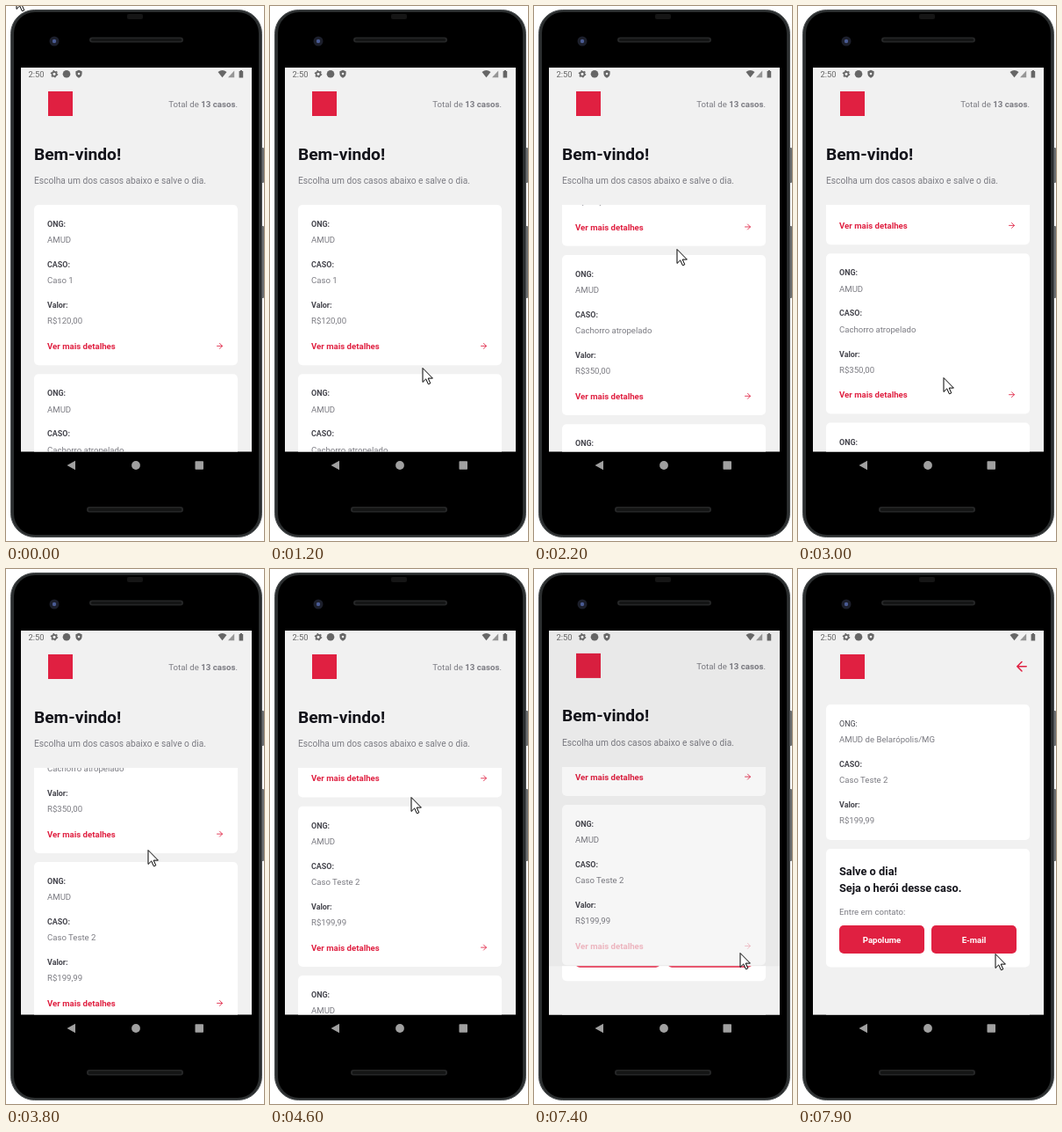
An HTML page for the animation above (8 s loop, 294 px wide and 608 px high).

```html
<!DOCTYPE html>
<html lang="pt-BR">
<head>
<meta charset="utf-8">
<style>
html, body { margin: 0; width: 100%; height: 100%; overflow: hidden; background: #fff; }
svg { display: block; font-family: Roboto, "Open Sans", sans-serif; }
</style>
</head>
<body>
<svg id="stage" width="294" height="608" viewBox="0 0 294 608"></svg>
<script>
const RED = '#e02041', GRAY = '#7b7b82', DARK = '#45454d', BG = '#f1f1f1';
const TOP = 70, HEIGHT = 436.6, PITCH = 192.3;

const text = (x, y, size, fill, s, extra = '') =>
  `<text x="${x}" y="${y}" font-size="${size}" fill="${fill}" ${extra}>${s}</text>`;
const bold = (x, y, size, fill, s, extra = '') =>
  text(x, y, size, fill, s, 'font-weight="700" ' + extra);
const rect = (x, y, w, h, fill, r = 0, extra = '') =>
  `<rect x="${x}" y="${y}" width="${w}" height="${h}" rx="${r}" fill="${fill}" ${extra}/>`;
const dot = (x, y, r, fill) => `<circle cx="${x}" cy="${y}" r="${r}" fill="${fill}"/>`;
const path = (d, extra) => `<path d="${d}" ${extra}/>`;
const arrow = (x, y, scale) => path('M-7 0H7M0-7L7 0L0 7',
  `transform="translate(${x} ${y}) scale(${scale} ${Math.abs(scale)})" fill="none" stroke="${RED}"
   stroke-width="2" stroke-linecap="round" stroke-linejoin="round"`);
const logo = rect(48, 97, 28, 28, RED);

// Label and value pairs, stacked from the top of a card
const fields = (y, values, firstBold = true) => ['ONG:', 'CASO:', 'Valor:'].map((label, i) =>
  (i || firstBold ? bold : text)(47, y + 25 + i * 46.1, 8.95, DARK, label) +
  text(47, y + 43.2 + i * 46.1, 9.6, GRAY, values[i])).join('');

const cases = [
  ['AMUD', 'Caso 1', 'R$120,00'],
  ['AMUD', 'Cachorro atropelado', 'R$350,00'],
  ['AMUD', 'Caso Teste 2', 'R$199,99'],
  ['AMUD', 'Caso 4', 'R$100,00']
];
const caseCard = (values, i) => {
  const y = 226 + i * PITCH;
  return rect(32, y, 232, 182.2, '#fff', 5.1) + fields(y, values) +
    `<g id="more${i}">${bold(47, y + 164, 9.65, RED, 'Ver mais detalhes')}${arrow(243.5, y + 160.4, .426)}</g>`;
};
const button = (x, label) => rect(x, 405, 97, 32, RED, 5.1) +
  bold(x + 48.5, 425.2, 9.6, '#fff', label, 'text-anchor="middle"');

const listScreen = rect(17, TOP, 263, HEIGHT + 20, BG) + logo +
  text(264, 114.8, 9.7, GRAY, 'Total de <tspan font-weight="700">13 casos</tspan>.', 'text-anchor="end"') +
  bold(32, 174.6, 19.2, '#13131a', 'Bem-vindo!') +
  text(32, 201.8, 10.2, GRAY, 'Escolha um dos casos abaixo e salve o dia.') +
  `<g clip-path="url(#listClip)"><g id="list">${cases.map(caseCard).join('')}</g></g>`;

const detailScreen = rect(17, TOP - 20, 263, HEIGHT + 40, BG) + logo + arrow(255, 110.7, -.746) +
  rect(32, 154, 232, 154, '#fff', 5.1) +
  fields(154, ['AMUD de Belarópolis/MG', 'Caso Teste 2', 'R$199,99'], false) +
  rect(32, 318, 232, 134.5, '#fff', 5.1) +
  bold(47, 348, 12.8, '#13131a', 'Salve o dia!') +
  bold(47, 367.3, 12.8, '#13131a', 'Seja o herói desse caso.') +
  text(47, 392.7, 9.6, GRAY, 'Entre em contato:') +
  button(47, 'Papolume') + button(152, 'E-mail');

const phone =
  rect(289, 161, 5, 40, '#6b6e70', 1) + rect(289, 250, 5, 82, '#6b6e70', 1) +
  rect(5.5, 4.5, 286, 599, '#2b2e2f', 27, 'stroke="#4c5052"') +
  rect(9, 7, 279, 594, '#000', 24) +
  rect(138, 9, 18, 6, '#151515', 2) +
  dot(55, 40, 5.5, '#1c1f2b') + dot(55, 40, 2.2, '#4a5c94') +
  rect(95, 35.5, 107, 6, '#252627', 3) + rect(97, 37, 103, 3, '#141515', 1.5) +
  rect(92, 569, 110, 6.5, '#252627', 3) + rect(94, 570.5, 106, 3.5, '#141515', 1.5);

const ICON = '#666';
const statusBar = text(25.5, 80.5, 9.4, ICON, '2:50') +
  `<circle cx="55" cy="77.3" r="2.5" fill="none" stroke="${ICON}" stroke-width="1.7"/>` +
  `<circle cx="55" cy="77.3" r="3.7" fill="none" stroke="${ICON}" stroke-width="1.2" stroke-dasharray="1.6 2.27"/>` +
  dot(69, 77.3, 4.3, ICON) +
  path('M83 72.8l3.6 1.4v2.6q0 3.4-3.6 5q-3.6-1.6-3.6-5v-2.6z', `fill="${ICON}"`) +
  dot(83, 77, 1.3, BG) +
  path('M241.5 75q5-3.8 10 0l-5 6.2z', `fill="${ICON}"`) +
  path('M253 81.2h7.2v-7.6z', `fill="${ICON}" opacity=".65"`) +
  path('M265.6 74h1.2v-1h2.2v1h1.2v7.4h-4.6z', `fill="${ICON}"`);

const NAV = '#a0a0a0';
const navBar = path('M69.5 522L79 516.8v10.4z', `fill="${NAV}"`) +
  dot(148, 522, 4.9, NAV) + rect(215.5, 517.3, 9.5, 9.5, NAV, .8);

const $ = id => document.getElementById(id);
$('stage').innerHTML = `<defs>
  <clipPath id="screenClip">${rect(17, TOP, 263, HEIGHT, '#000')}</clipPath>
  <clipPath id="listClip">${rect(17, 226, 263, 300, '#000')}</clipPath>
  <clipPath id="revealClip"><rect id="reveal" x="17" width="263" height="${HEIGHT}"/></clipPath>
</defs>
${phone}${navBar}
<g clip-path="url(#screenClip)">
  <g id="listScreen">${listScreen}</g>
  ${rect(17, TOP, 263, HEIGHT, '#000', 0, 'id="shade"')}
  <g clip-path="url(#revealClip)"><g id="detailScreen">${detailScreen}</g></g>
</g>
${statusBar}
${path('M.5 .5v16l3.7-3.6 2.7 5.9 2.4-1-2.6-5.7h5.2z', 'id="cursor" fill="#fff" stroke="#000"')}`;

const clamp = v => Math.max(0, Math.min(1, v));

// Linear track through [time, ...values] keys
function track(keys, t) {
  const i = keys.findIndex(k => k[0] > t);
  if (i < 0) return keys[keys.length - 1].slice(1);
  if (i === 0) return keys[0].slice(1);
  const a = keys[i - 1], b = keys[i], u = (t - a[0]) / (b[0] - a[0]);
  return a.slice(1).map((v, n) => v + (b[n + 1] - v) * u);
}

// Curve cubic-bezier(.20833, .82, .25, 1)
function easeReveal(x) {
  let lo = 0, hi = 1;
  const at = (s, a, b) => 3 * (1 - s) ** 2 * s * a + 3 * (1 - s) * s * s * b + s ** 3;
  for (let i = 0; i < 24; i++) {
    const mid = (lo + hi) / 2;
    if (at(mid, .20833, .25) < x) lo = mid; else hi = mid;
  }
  return at(hi, .82, 1);
}

const cursorKeys = [
  [200, 11, -13], [1100, 179, 381], [1200, 173, 411], [1400, 170, 443],
  [1500, 170, 443], [2200, 162, 276], [2700, 162, 276],
  [3100, 166, 470], [3200, 166, 470], [3800, 161, 319], [4500, 160, 259],
  [4600, 160, 259], [4900, 157, 337], [5000, 157, 337], [5600, 172, 436],
  [6100, 172, 436], [6400, 234, 436], [7600, 234, 436], [7900, 224, 437]
];
const scrollKeys = [
  [1500, 0], [1600, 8], [2100, 123], [2200, 135.4], [2600, 137],
  [3200, 137], [3800, 277.5], [4500, 340.7], [4900, 341.5]
];

const shift = (id, x, y) => $(id).setAttribute('transform', `translate(${x} ${y})`);

function draw(t) {
  const [x, y] = track(cursorKeys, t);
  shift('cursor', Math.round(x) + .5, Math.round(y));
  shift('list', 0, -track(scrollKeys, t)[0]);
  $('more2').setAttribute('opacity', 1 - .7 * clamp((t - 6350) / 150));

  const start = 7387.3;
  const p = t > start ? easeReveal(clamp((t - start) / 425)) : 0;
  shift('listScreen', 0, -HEIGHT * .02 * p);
  $('shade').setAttribute('opacity', .1 * clamp(p / .36));
  $('reveal').setAttribute('y', TOP + HEIGHT * (1 - p));
  shift('detailScreen', 0, HEIGHT * .041 * (1 - p));
}

const begin = performance.now();
function tick() {
  draw((performance.now() - begin) % 8000);
  requestAnimationFrame(tick);
}
draw(0);
requestAnimationFrame(tick);
</script>
</body>
</html>
```
